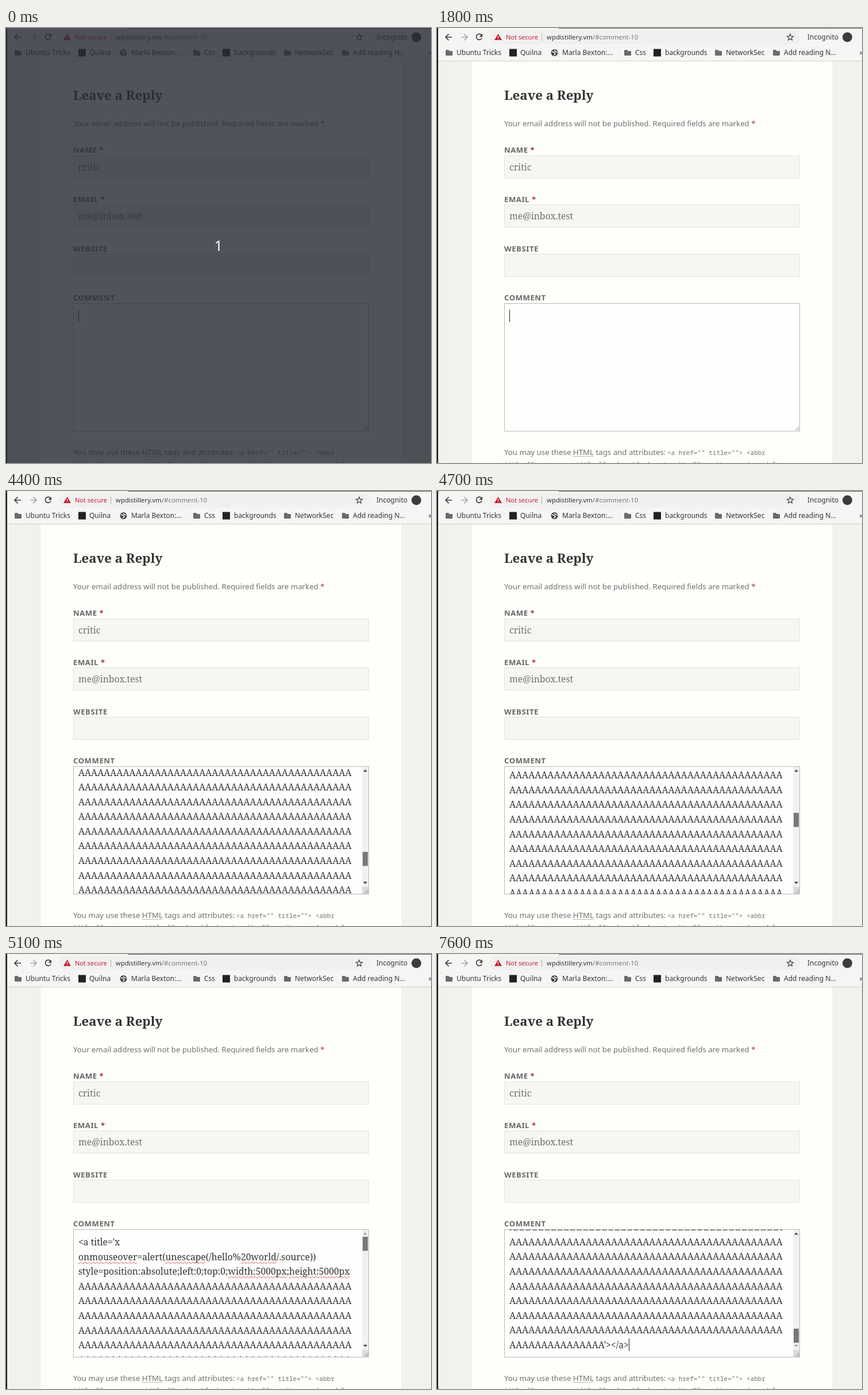
Recreate the animation shown at these times as an HTML page. Size 740 by 757 pixels, loop 8000 ms.

```html
<!DOCTYPE html>
<html lang="en">
<head>
<meta charset="utf-8">
<title>Comment form</title>
<style>
html, body { margin: 0; width: 100%; height: 100%; overflow: hidden; background: #f1f1ed; }
svg, #shade { position: absolute; left: 0; top: 0; width: 740px; height: 757px; }
text { font-family: "Noto Sans", sans-serif; white-space: pre; }
.ui { font-size: 12px; fill: #333; }
.url { font-size: 11.35px; }
.body { font-size: 13.27px; fill: #707070; }
.label { font-size: 13.15px; font-weight: 700; letter-spacing: .04em; fill: #666; }
.star { fill: #ab3040; }
.code { font-family: "Noto Sans Mono", monospace; font-size: 10.96px; }
.value { font: 15.7px "Noto Serif", serif; fill: #707070; }
.field { fill: #f6f6f3; stroke: #e2e2df; }
.line { fill: none; stroke: #3c3c3c; stroke-width: 1.7; }
#box { position: absolute; left: 118px; top: 480px; width: 501px; height: 221px; overflow: hidden; }
#content { position: absolute; left: 8px; top: 9px; }
#typed { margin: 0; font: 15.7px/25.6px "Noto Serif", serif; color: #333; }
#typed u { text-decoration: underline wavy #dc4a58 1px; text-underline-offset: 2px; text-decoration-skip-ink: none; }
#caret { position: absolute; width: 1px; height: 22px; background: #222; }
#shade { background: rgba(40, 44, 52, .81); color: #fff; text-align: center; font: 25px/757px "Noto Sans", sans-serif; }
</style>
</head>
<body>
<svg viewBox="0 0 740 757">
  <defs>
    <path id="folder" d="M0 1.5Q0 0 1.5 0H5L6.5 2H11Q12 2 12 3V9Q12 10 11 10H1Q0 10 0 9Z" fill="#6b6b6b"/>
  </defs>

  <!-- page -->
  <rect width="740" height="757" fill="#f1f1ed"/>
  <rect x="59" y="58" width="631" height="699" fill="#e8e8e4"/>
  <rect x="60" y="58" width="629" height="699" fill="#fefefb"/>

  <!-- browser bar -->
  <rect width="740" height="58" fill="#f5f6f4"/>
  <rect x="92" y="4" width="540" height="24" rx="12" fill="#f0f1ef"/>
  <rect y="57" width="740" height="1" fill="#cfd0ce"/>
  <rect x="212" width="528" height="1" fill="#555"/>
  <rect width="2" height="757" fill="#1c1c1c"/>
  <path class="line" d="M26 16H15.5M20.5 10.5L15 16L20.5 21.5"/>
  <path class="line" style="stroke:#a5a6a5" d="M42 16H52.5M47.5 10.5L53 16L47.5 21.5"/>
  <path class="line" d="M77.5 12.5A5 5 0 1 0 78 17.5"/>
  <path d="M79 10V15.5H73.5Z" fill="#3c3c3c"/>
  <path d="M106.5 10L113 21H100Z" fill="#c5203a"/>
  <path d="M106.5 14V17M106.5 18.2V19.5" stroke="#fff" stroke-width="1.3"/>
  <rect x="182" y="10" width="1" height="12" fill="#aaa"/>
  <path class="line" style="stroke-width:1.2" d="M615 10.5L616.5 14.2L620.5 14.5L617.4 17.1L618.4 21L615 18.9L611.6 21L612.6 17.1L609.5 14.5L613.5 14.2Z"/>
  <circle cx="714.5" cy="16" r="8.5" fill="#3c3c3c"/>
  <text class="ui" style="font-size:11px;fill:#c5203a" x="120" y="20">Not secure</text>
  <text class="ui url" x="191" y="20">wpdistillery.vm<tspan fill="#777">/#comment-10</tspan></text>
  <text class="ui" x="645" y="20">Incognito</text>

  <!-- bookmarks -->
  <use href="#folder" x="15" y="38"/>
  <use href="#folder" x="326" y="38"/>
  <use href="#folder" x="484" y="38"/>
  <use href="#folder" x="585" y="38"/>
  <rect x="126" y="36.5" width="13" height="13" fill="#222"/>
  <rect x="377" y="36.5" width="13" height="13" fill="#222"/>
  <circle cx="204.5" cy="43" r="6" fill="#444"/>
  <path d="M200 41L204 42.5L206 45L203.5 47.5M204 38.5L206 41L209.5 42" fill="none" stroke="#f5f6f4" stroke-width="1.5"/>
  <g class="ui">
    <text x="34" y="47">Ubuntu Tricks</text>
    <text x="145" y="47">Quilna</text>
    <text x="218" y="47">Marla Bexton:…</text>
    <text x="345" y="47">Css</text>
    <text x="397" y="47">backgrounds</text>
    <text x="503" y="47">NetworkSec</text>
    <text x="604" y="47">Add reading N…</text>
    <text x="735.5" y="47">»</text>
  </g>

  <!-- form -->
  <text x="117" y="124.5" font-size="22.3" font-weight="700" fill="#333" style="font-family:'Noto Serif',serif">Leave a Reply</text>
  <text class="body" x="117" y="171">Your email address will not be published. Required fields are marked <tspan class="star">*</tspan></text>
  <text class="label" x="117" y="217">NAME <tspan class="star">*</tspan></text>
  <text class="label" x="117" y="302.5">EMAIL <tspan class="star">*</tspan></text>
  <text class="label" x="117" y="388.5">WEBSITE</text>
  <text class="label" x="117" y="474">COMMENT</text>
  <rect class="field" x="117.5" y="222.5" width="514" height="39"/>
  <rect class="field" x="117.5" y="307.5" width="514" height="39"/>
  <rect class="field" x="117.5" y="393.5" width="514" height="39"/>
  <text class="value" x="126" y="247.5">critic</text>
  <text class="value" x="126" y="333">me@inbox.test</text>
  <rect x="117.5" y="479.5" width="514" height="222" fill="#fefefc" stroke="#b9b9b7"/>
  <text class="body" x="117" y="743">You may use these HTML tags and attributes:</text>
  <path d="M237 745.5H272" stroke="#777" stroke-dasharray="1 1"/>
  <text class="body code" x="401" y="743">&lt;a href="" title=""&gt; &lt;abbr</text>
  <text class="body code" x="117" y="763">title=""&gt; &lt;acronym title=""&gt; &lt;b&gt; &lt;blockquote cite=""&gt; &lt;cite&gt; &lt;code&gt; &lt;del</text>

  <g id="scrollbar">
    <rect x="620" y="480" width="11" height="209" fill="#f1f1ef"/>
    <rect x="620" y="689" width="11" height="12" fill="#dcdcda"/>
    <path id="up" d="M622 488.5H629L625.5 484.5Z"/>
    <path id="down" d="M622 680H629L625.5 684Z"/>
    <rect id="thumb" x="621" width="9" height="24.5"/>
  </g>
  <path d="M624.5 700L630.5 694M628 700L630.5 697.5" stroke="#777"/>
</svg>
<div id="box"><div id="content"><pre id="typed"></pre><div id="caret"></div></div></div>
<div id="shade">1</div>

<script>
const LOOP = 8000, LINE = 25.6, LINES = 65, MAX_SCROLL = 57 * LINE, TRAVEL = 160;
const $ = id => document.getElementById(id);

$('typed').innerHTML = [
  "&lt;a title='x",
  '<u>onmouseover</u>=alert(<u>unescape</u>(/hello%<u>20world</u>/.source))',
  'style=position:absolute;left:0;top:0;<u>width:5000px</u>;<u>height:5000px</u>',
  ...Array(LINES - 4).fill('A'.repeat(43)),
  'A'.repeat(15) + "'&gt;&lt;/a&gt;"
].join('\n');

// [start time, value] pairs; each value holds until the next one
const scrolls = [
  [0, 0], [2300, 1448.6], [4300, 1400], [4400, 1240], [4500, 1030], [4600, 825],
  [4700, 621], [4800, 429], [4900, 246], [5000, 91], [5100, 0],
  [7400, 429], [7500, 1003], [7600, MAX_SCROLL]
];
const carets = [[0, 1], [500, 0], [600, 1], [1200, 0], [1800, 1], [2800, 0], [3400, 1], [4000, 0], [7600, 1]];
const thumbs = [[0, '#c1c1bf'], [3500, '#a8a8a6'], [4000, '#787876']];
const at = (steps, t) => steps.findLast(([start]) => start <= t)[1];
const show = (id, on) => $(id).style.visibility = on ? 'visible' : 'hidden';

function draw(t) {
  const pasted = t >= 2300, scroll = at(scrolls, t);
  show('shade', t < 500);
  show('typed', pasted);
  show('scrollbar', pasted);
  show('caret', at(carets, t));
  $('content').style.transform = `translateY(${-Math.round(scroll)}px)`;
  $('caret').style.left = pasted ? '208px' : '0';
  $('caret').style.top = (pasted ? (LINES - 1) * LINE : 0) + 1 + 'px';
  $('thumb').setAttribute('y', 492 + scroll / MAX_SCROLL * TRAVEL);
  $('thumb').setAttribute('fill', at(thumbs, t));
  $('up').setAttribute('fill', scroll > 0 ? '#444' : '#a3a3a1');
  $('down').setAttribute('fill', scroll < MAX_SCROLL ? '#444' : '#a3a3a1');
}

function tick() {
  draw(performance.now() % LOOP);
  requestAnimationFrame(tick);
}
tick();
</script>
</body>
</html>
```
